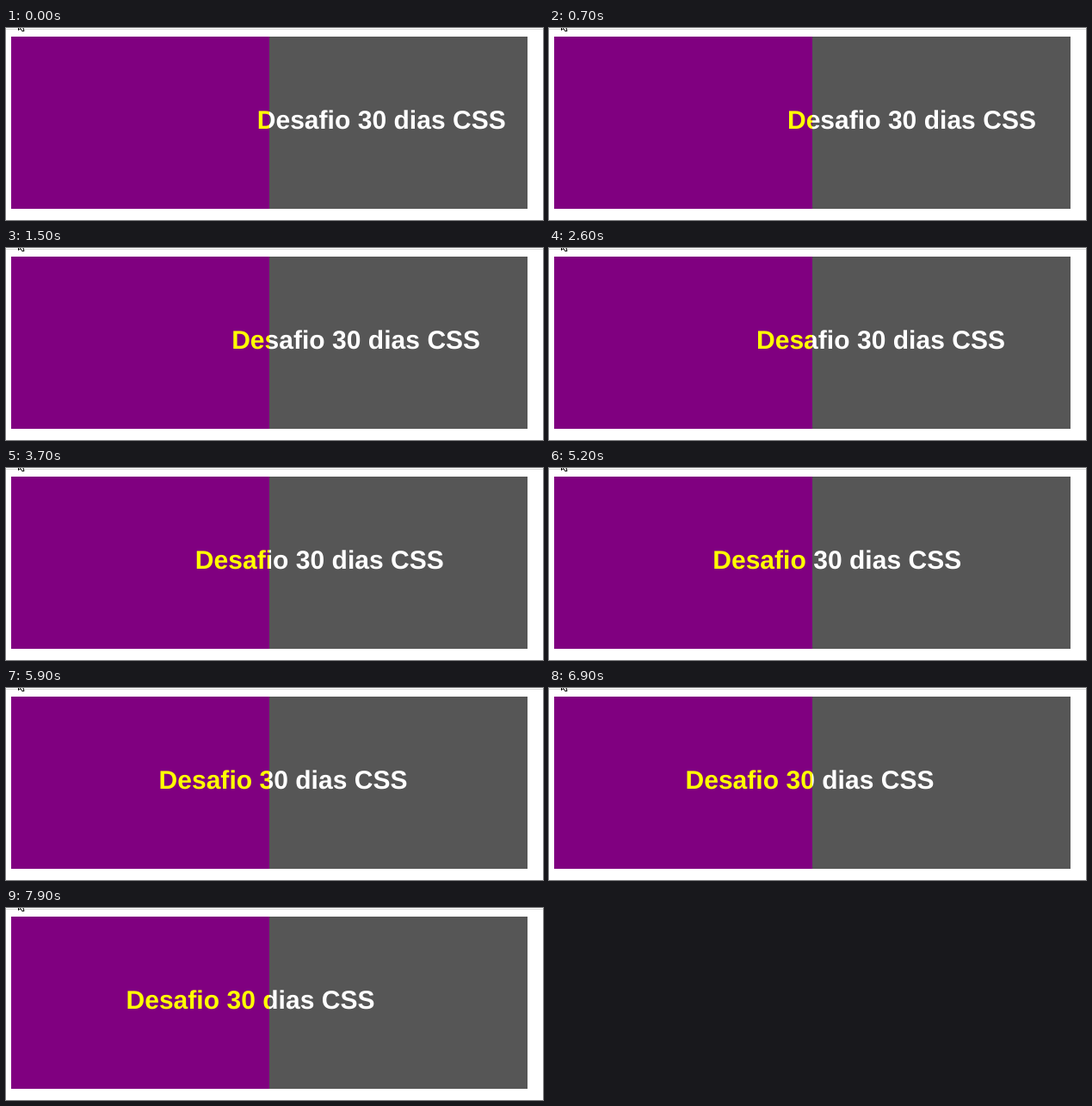
An HTML page for the animation above (8 s loop, 624 px wide and 223 px high).

```html
<!DOCTYPE html>
<html lang="pt">
<head>
<meta charset="utf-8">
<title>Desafio 30 dias CSS</title>
<style>
  html, body { margin: 0; height: 100%; overflow: hidden; background: #fff; }
  svg { display: block; width: 624px; height: 223px; }
  text {
    font: bold 30px Arial, "Liberation Sans", sans-serif;
    letter-spacing: .03px;
    text-rendering: geometricPrecision;
  }
</style>
</head>
<body>
<svg viewBox="0 0 624 223">
  <clipPath id="left"><path d="M6 10h300v200H6z"/></clipPath>
  <clipPath id="right"><path d="M306 10h300v200H306z"/></clipPath>

  <path d="M0 1h624v1H0z" fill="#dcdcdc"/>
  <!-- tip of the mouse pointer -->
  <path d="M14.5 0v2.5L17 .5l1.5 3h2.5L20 0" fill="#fff" stroke="#000"/>

  <path d="M6 10h300v200H6z" fill="#800080"/>
  <path d="M306 10h300v200H306z" fill="#565656"/>
  <g clip-path="url(#left)"><text y="117" fill="#ff0">Desafio 30 dias CSS</text></g>
  <g clip-path="url(#right)"><text y="117" fill="#fff">Desafio 30 dias CSS</text></g>
</svg>
<script>
  const LOOP = 8000, TICK = 100, START = 291.75, STEP = 2.115;
  const labels = document.querySelectorAll('text');

  function draw() {
    const tick = Math.floor(performance.now() % LOOP / TICK);
    // the text rests for one tick in every eleven
    const rests = Math.max(0, Math.floor((tick - 1) / 11));
    const x = START - STEP * (tick - rests);
    for (const label of labels) label.setAttribute('x', x);
    requestAnimationFrame(draw);
  }
  draw();
</script>
</body>
</html>
```
